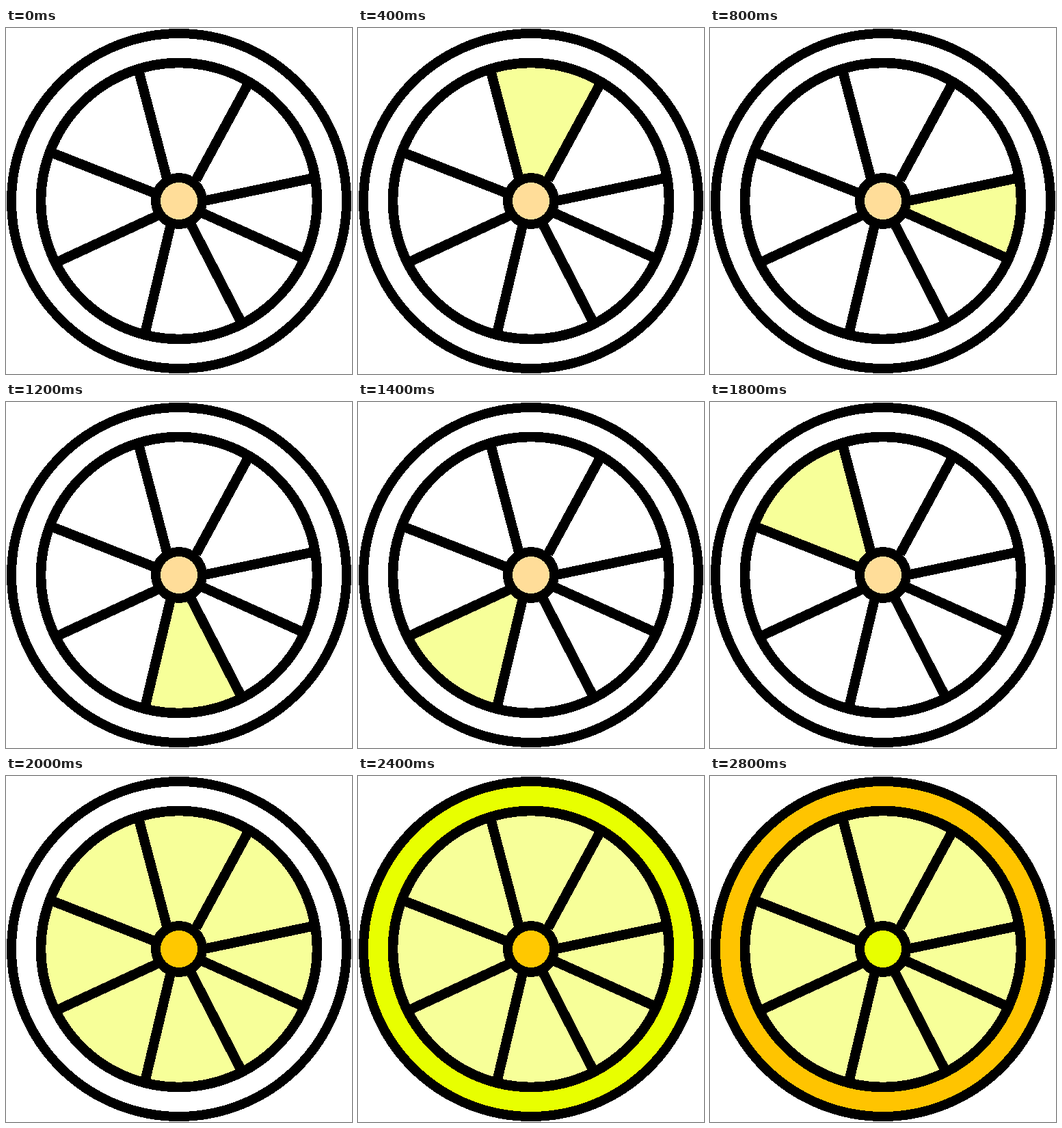
An HTML page without scripts that plays this animation: 506x506 px, repeating every 3.2 s.

```html
<!DOCTYPE html>
<html lang="en">
<head>
<meta charset="utf-8">
<title>Wheel</title>
<style>
  html, body { margin: 0; width: 100%; height: 100%; overflow: hidden; background: #fff; }
  svg { display: block; width: 100%; height: 100%; shape-rendering: crispEdges; }

  .line { fill: none; stroke: #000; stroke-width: 14; }
  .spokes, .ring { stroke-width: 14.5; }
  .wedges path, .disc { fill: #f7ff99; opacity: 0; }

  .wedges path { animation: blink 3.2s step-end infinite; animation-delay: calc(var(--i) * .2s - 2.8s); }
  .disc { animation: fill-up 3.2s step-end infinite; }
  .hub { animation: hub 3.2s step-end infinite; }
  .rim { animation: rim 3.2s step-end infinite; }

  @keyframes blink { 0% { opacity: 1; } 6.25%, 100% { opacity: 0; } }
  @keyframes fill-up { 0% { opacity: 0; } 62.5%, 100% { opacity: 1; } }
  @keyframes hub { 0% { fill: #fd9; } 62.5% { fill: #ffc800; } 87.5%, 100% { fill: #e8ff00; } }
  @keyframes rim { 0% { fill: #fff; } 75% { fill: #e8ff00; } 87.5%, 100% { fill: #ffc400; } }
</style>
</head>
<body>
<svg viewBox="0 0 506 506">
  <circle class="line rim" cx="253" cy="253" r="245"/>
  <circle cx="253" cy="253" r="202" fill="#fff"/>
  <circle class="disc" cx="253" cy="253" r="202"/>

  <!-- clockwise from the top -->
  <g class="wedges">
    <path style="--i:0" d="M235 220L194 64A200 200 0 0 1 354 82L278 222Z"/>
    <path style="--i:1" d="M278 222L354 82A200 200 0 0 1 450 219L290 252.5Z"/>
    <path style="--i:2" d="M290 252.5L450 219A200 200 0 0 1 435 337L286 270Z"/>
    <path style="--i:3" d="M286 270L435 337A200 200 0 0 1 344 431L270 287Z"/>
    <path style="--i:4" d="M270 287L344 431A200 200 0 0 1 204 445L241 289Z"/>
    <path style="--i:5" d="M241 289L204 445A200 200 0 0 1 75 342L222 274Z"/>
    <path style="--i:6" d="M222 274L75 342A200 200 0 0 1 66 182L220 242.5Z"/>
    <path style="--i:7" d="M220 242.5L66 182A200 200 0 0 1 194 64L235 220Z"/>
  </g>

  <path class="line spokes" d="M235.4 220L194.4 64M278 222L354 82M290 252.8L450 219.3M286 270L435 337M270.3 287L344.3 431M240.6 289L203.6 445M222 274.2L75 342.2M220 242.5L66 182"/>
  <circle class="line ring" cx="253" cy="253" r="202"/>
  <circle class="line hub" cx="253" cy="253" r="34"/>
</svg>
</body>
</html>
```
